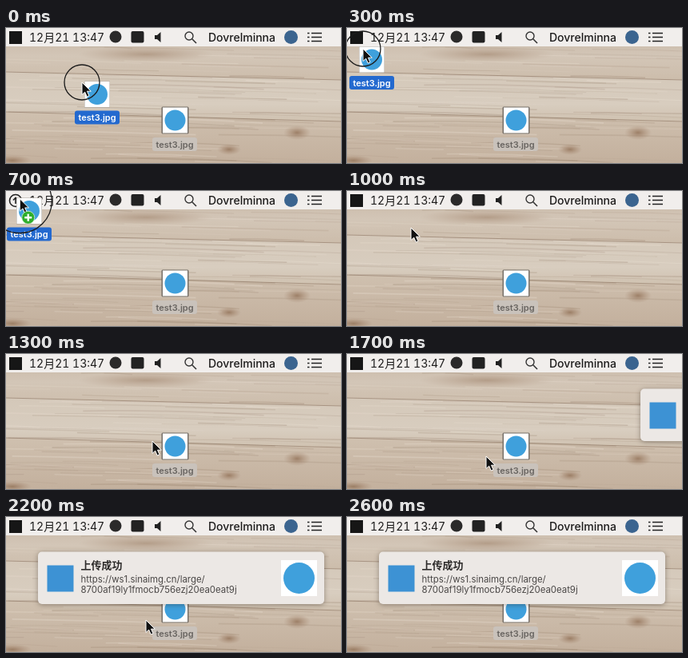
Recreate the animation shown at these times as an HTML page. Size 419 by 169 pixels, loop 2700 ms.

```html
<!DOCTYPE html>
<html lang="en">
<head>
<meta charset="utf-8">
<title>Drag to menu bar upload</title>
<style>
html, body { margin: 0; width: 100%; height: 100%; overflow: hidden; }
svg { display: block; width: 419px; height: 169px; }
text { font-family: Inter, "Noto Sans CJK SC", "Noto Sans CJK", sans-serif; }
.menu { font-size: 14px; fill: #1c1b1b; font-variant-numeric: tabular-nums; }
.file { font-size: 11px; font-weight: 600; text-anchor: middle; }
.note { font-size: 11.4px; fill: #4a4746; }
.title { font-size: 13px; font-weight: 700; fill: #2e2c2b; }
#panel { filter: drop-shadow(0 1px 3px rgba(40, 30, 20, .4)); }
</style>
</head>
<body>
<svg viewBox="0 0 419 169">
  <defs>
    <linearGradient id="top" x2="0" y2="1">
      <stop stop-color="#c4b3a2"/><stop offset=".5" stop-color="#d3c6b7"/><stop offset="1" stop-color="#cbbba9"/>
    </linearGradient>
    <linearGradient id="mid" x2="0" y2="1">
      <stop stop-color="#d4c8b9"/><stop offset=".6" stop-color="#d8cdbf"/><stop offset="1" stop-color="#cdbeac"/>
    </linearGradient>
    <linearGradient id="low" x2="0" y2="1">
      <stop stop-color="#cfc0af"/><stop offset="1" stop-color="#c3b09d"/>
    </linearGradient>
    <radialGradient id="knot">
      <stop stop-color="#8d6c51" stop-opacity=".75"/><stop offset="1" stop-color="#a08068" stop-opacity="0"/>
    </radialGradient>
    <g id="thumb">
      <rect x="-15.5" y="-16" width="31" height="32" fill="#fff"/>
      <circle r="13" fill="#3fa0dc"/>
    </g>
  </defs>

  <rect width="419" height="70" fill="url(#top)"/>
  <path d="M0 55L419 65V122H0Z" fill="url(#mid)"/>
  <path d="M0 105L419 117V169H0Z" fill="url(#low)"/>
  <g id="grain" fill="none"></g>
  <g fill="url(#knot)">
    <ellipse cx="175" cy="33" rx="85" ry="10" opacity=".6"/>
    <ellipse cx="364" cy="131" rx="17" ry="9"/>
    <ellipse cx="279" cy="152" rx="15" ry="7"/>
    <ellipse cx="8" cy="166" rx="24" ry="7"/>
  </g>
  <path d="M0 55L419 65M0 105L419 117" stroke="#937c69" stroke-opacity=".65"/>

  <rect width="419" height="23" fill="#f1eeec"/>
  <rect id="idle" x="4" y="4" width="16" height="16" fill="#161616"/>
  <g id="busy" fill="none" stroke="#222" stroke-width="1.6">
    <circle cx="12" cy="12" r="7.5"/>
    <path d="M12 16V8.5M9 11.5L12 8.5L15 11.5"/>
  </g>
  <text class="menu" x="29" y="16.5">12月21 13:47</text>
  <circle cx="137" cy="11" r="7.5" fill="#2b2a2a"/>
  <rect x="156.5" y="4" width="16" height="14.5" rx="2" fill="#222"/>
  <path d="M186 9H189L193.500 5V18L189 14H186Z" fill="#222"/>
  <path d="M232.800 13.800L238 19" stroke="#333" stroke-width="1.6"/>
  <circle cx="229" cy="10" r="5" fill="none" stroke="#333" stroke-width="1.4"/>
  <text class="menu" x="253" y="16.5" font-weight="500">Dovrelminna</text>
  <circle cx="356.500" cy="11.500" r="8.500" fill="#3b648f"/>
  <path d="M377 6.500h2.500M382 6.500h13M377 11.500h2.500M382 11.500h13M377 16.500h2.500M382 16.500h13" stroke="#222" stroke-width="1.6"/>

  <g transform="translate(211.500 115.500)">
    <rect x="-17" y="-17" width="34" height="34" rx="1.500" fill="#777069"/>
    <use href="#thumb"/>
    <rect x="-28.500" y="21.500" width="56" height="17" rx="3" fill="#c9c2bb"/>
    <text class="file" x="-.5" y="34" fill="#686460">test3.jpg</text>
  </g>

  <g id="panel">
    <rect y="43.500" width="358" height="65.500" rx="5" fill="#ece8e5"/>
    <rect x="11.500" y="60.500" width="33" height="33" fill="#3d92d4"/>
    <text class="title" x="53.500" y="65">上传成功</text>
    <text class="note" x="53.500" y="82">https://ws1.sinaimg.cn/large/</text>
    <text class="note" x="53.500" y="95">8700af19ly1fmocb756ezj20ea0eat9j</text>
    <rect x="304" y="54" width="45" height="45" fill="#fff"/>
    <circle cx="326.500" cy="76.500" r="19.500" fill="#3fa0dc"/>
  </g>

  <g id="drag">
    <rect x="-16" y="-16.500" width="32" height="33" fill="#a9a39c"/>
    <use href="#thumb"/>
    <rect x="-28" y="20.500" width="56" height="17" rx="3" fill="#2369cf"/>
    <text class="file" y="33" fill="#fff">test3.jpg</text>
  </g>
  <circle id="ring" fill="none" stroke="#1b1b1b" stroke-width="1.300"/>
  <g id="cursor">
    <path d="M0 0V15.500L3.700 12.200L6.200 18L9 16.800L6.500 11.200H11.300Z" fill="#111" stroke="#fff" stroke-width="1"/>
    <g id="plus">
      <circle cx="10.500" cy="23.500" r="8" fill="#2fae2c" stroke="#d9efd7" stroke-width=".8"/>
      <path d="M10.500 19V28M6 23.500H15" stroke="#fff" stroke-width="2.400"/>
    </g>
  </g>
</svg>
<script>
const LOOP = 2700, STEP = 100;
const $ = id => document.getElementById(id);

// Each key: [time, ...values]
const cursorKeys = [[0, 95, 68], [100, 70, 54], [200, 40, 36], [300, 20, 26], [500, 17, 12], [600, 16.5, 9.5],
  [800, 18, 10], [1000, 80, 46], [1200, 165, 98], [1300, 183, 109], [1500, 179, 119], [1700, 174, 128],
  [1900, 175, 129], [2300, 175, 129], [2500, 182, 155], [2600, 184, 180]];
const dragKeys = [[0, 114, 83], [100, 82, 67], [200, 50, 49], [300, 31, 39.5], [500, 29, 28], [600, 29, 25]];
const panelKeys = [[1600, 430], [1700, 367], [1800, 130], [1900, 41], [2000, 40]];
const ringKeys = [[600, 22, 1], [700, 40, 1], [800, 56, .4]];

function track(keys, t) {
  const i = keys.findIndex(k => k[0] > t);
  if (i === 0) return keys[0].slice(1);
  if (i < 0) return keys[keys.length - 1].slice(1);
  const a = keys[i - 1], b = keys[i], u = (t - a[0]) / (b[0] - a[0]);
  return a.slice(1).map((v, j) => v + (b[j + 1] - v) * u);
}

function show(id, on) { $(id).style.display = on ? "" : "none"; }
function move(id, x, y) { $(id).setAttribute("transform", `translate(${x} ${y})`); }
function set(id, attrs) { for (const k in attrs) $(id).setAttribute(k, attrs[k]); }

function drawGrain() {
  let seed = 11;
  const rnd = () => (seed = seed * 16807 % 2147483647) / 2147483647;
  let out = "";
  for (let i = 0; i < 90; i++) {
    const x = rnd() * 400 - 80, y = 24 + rnd() * 145, w = 60 + rnd() * 200;
    const bend = rnd() * 5 - 2;
    const color = rnd() < .6 ? "#8f7865" : "#efe6da";
    out += `<path d="M${x} ${y}q${w / 2} ${bend} ${w} ${w * .025}" stroke="${color}"
      stroke-opacity="${.1 + rnd() * .17}" stroke-width="${.5 + rnd() * 1.3}"/>`;
  }
  $("grain").innerHTML = out;
}

function render(t) {
  const [x, y] = track(cursorKeys, t);
  const [r, opacity] = track(ringKeys, t);
  const over = t >= 400 && t < 800;
  const uploading = t >= 400 && t < 1000;
  move("cursor", x, y);
  move("drag", ...track(dragKeys, t));
  move("panel", track(panelKeys, t)[0], 0);
  set("ring", { cx: x, cy: y + (t >= 700 ? 3 : 0), r, opacity });
  show("drag", t < 800);
  show("ring", t < 900);
  show("plus", over);
  show("busy", uploading);
  show("idle", !uploading);
  show("panel", t >= 1700);
}

function tick() {
  render(Math.floor(performance.now() % LOOP / STEP) * STEP);
  requestAnimationFrame(tick);
}

drawGrain();
tick();
</script>
</body>
</html>
```
